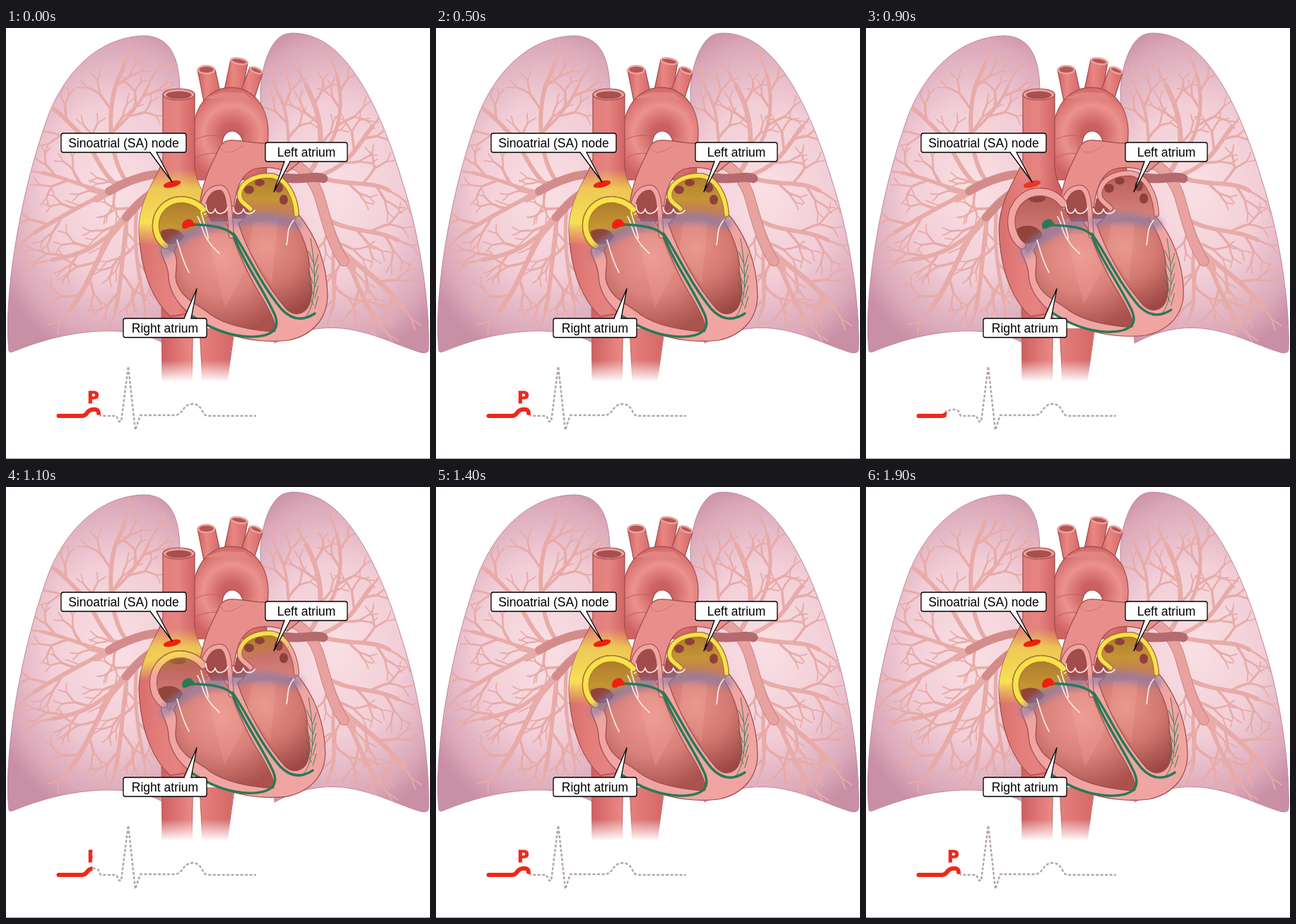
Recreate the animation shown at these times as an HTML page. Size 600 by 610 pixels, loop 2000 ms.

```html
<!DOCTYPE html>
<html lang="en">
<head>
<meta charset="utf-8">
<title>Atrial depolarisation</title>
<style>
html, body { margin: 0; width: 100%; height: 100%; overflow: hidden; background: #fff; }
svg { display: block; width: 600px; height: 610px; }
text { font: 17.5px "Liberation Sans", Arial, sans-serif; }
.line { fill: none; stroke-linecap: round; stroke-linejoin: round; }
.edge { stroke: #a04a4b; stroke-width: 1.2; }
.label { fill: #fff; stroke: #000; stroke-width: 1.3; stroke-linejoin: round; }
</style>
</head>
<body>
<svg viewBox="0 0 600 610">
<defs>
  <radialGradient id="lungL" gradientUnits="userSpaceOnUse" cx="155" cy="230" r="245" gradientTransform="translate(34 0) scale(.78 1)">
    <stop offset="0" stop-color="#f9e0e4"/><stop offset=".5" stop-color="#f2ced7"/><stop offset=".85" stop-color="#dba9ba"/><stop offset="1" stop-color="#c98fa5"/>
  </radialGradient>
  <radialGradient id="lungR" gradientUnits="userSpaceOnUse" cx="465" cy="230" r="245" gradientTransform="translate(102 0) scale(.78 1)">
    <stop offset="0" stop-color="#f9e0e4"/><stop offset=".5" stop-color="#f2ced7"/><stop offset=".85" stop-color="#dba9ba"/><stop offset="1" stop-color="#c98fa5"/>
  </radialGradient>
  <linearGradient id="tube">
    <stop offset="0" stop-color="#cd5f60"/><stop offset=".4" stop-color="#e98783"/><stop offset="1" stop-color="#d46867"/>
  </linearGradient>
  <linearGradient id="body" gradientUnits="userSpaceOnUse" x1="188" y1="0" x2="290" y2="0">
    <stop offset="0" stop-color="#d86e6d"/><stop offset=".25" stop-color="#e27c79"/><stop offset=".55" stop-color="#e58481"/><stop offset=".8" stop-color="#d06161"/>
  </linearGradient>
  <radialGradient id="arch" gradientUnits="userSpaceOnUse" cx="320" cy="150" r="68">
    <stop offset=".2" stop-color="#cb6061"/><stop offset=".6" stop-color="#ec928d"/><stop offset="1" stop-color="#cf6263"/>
  </radialGradient>
  <linearGradient id="fade" x1="0" y1="0" x2="0" y2="1">
    <stop offset="0" stop-color="#fff" stop-opacity="0"/><stop offset="1" stop-color="#fff"/>
  </linearGradient>
  <radialGradient id="rv" gradientUnits="userSpaceOnUse" cx="305" cy="325" r="108">
    <stop offset="0" stop-color="#ea988f"/><stop offset=".5" stop-color="#da827b"/><stop offset="1" stop-color="#a9524e"/>
  </radialGradient>
  <radialGradient id="lv" gradientUnits="userSpaceOnUse" cx="368" cy="310" r="100">
    <stop offset="0" stop-color="#e69289"/><stop offset=".5" stop-color="#d27870"/><stop offset="1" stop-color="#9c4845"/>
  </radialGradient>
  <linearGradient id="atrium" x1="0" y1="0" x2="0" y2="1">
    <stop offset="0" stop-color="#b85e59"/><stop offset="1" stop-color="#dc877f"/>
  </linearGradient>
  <linearGradient id="ochre" x1="0" y1="0" x2="0" y2="1">
    <stop offset="0" stop-color="#ae7c2b"/><stop offset=".5" stop-color="#c59536"/><stop offset="1" stop-color="#b66f4e" stop-opacity=".2"/>
  </linearGradient>
  <linearGradient id="glow" gradientUnits="userSpaceOnUse" x1="0" y1="200" x2="0" y2="308">
    <stop offset="0" stop-color="#f2d645" stop-opacity="0"/><stop offset=".25" stop-color="#f0d650" stop-opacity=".85"/>
    <stop offset=".7" stop-color="#f6e055"/><stop offset="1" stop-color="#f2d645" stop-opacity="0"/>
  </linearGradient>
  <linearGradient id="wipe" gradientUnits="userSpaceOnUse" x1="235">
    <stop offset="0" stop-color="#fff"/><stop offset="1" stop-color="#000"/>
  </linearGradient>
  <mask id="spread" maskUnits="userSpaceOnUse" x="150" y="150" width="300" height="220">
    <rect x="150" y="150" width="300" height="220" fill="url(#wipe)"/>
  </mask>
  <filter id="soft" x="-20%" y="-60%" width="140%" height="220%"><feGaussianBlur stdDeviation="4"/></filter>
  <path id="lungPathL" d="M4 457C-4 380 20 230 62 118C92 48 142 12 196 11C236 12 246 48 246 92C246 130 238 160 232 190V452C205 432 165 426 120 430C75 434 40 446 10 458Q5 460 4 457Z"/>
  <path id="lungPathR" d="M598 455C600 400 588 300 560 215C538 140 500 50 450 20C430 8 405 4 392 10C372 20 360 60 360 95C362 130 364 170 366 200L380 446C410 430 440 422 475 425C520 430 550 448 586 459Q597 462 598 455Z"/>
  <path id="bodyPath" d="M222 94V185C218 208 190 235 188 285C190 345 208 385 232 408L290 400L285 240C272 225 266 205 267 185V94Z"/>
  <path id="raWall" d="M226 308C209 296 207 270 222 254C238 238 264 240 279 257"/>
  <path id="raRoom" d="M227 310C210 294 210 270 224 256C238 243 264 243 277 259L286 275C264 285 247 298 234 318Z"/>
  <path id="laWall" d="M346 256C338 248 328 245 331 232C336 215 356 208 375 209C396 212 410 238 411 264"/>
  <path id="laRoom" d="M346 256C338 248 328 245 331 232C336 215 356 208 375 209C396 212 410 238 411 272C390 268 360 264 334 276Z"/>
  <path id="vein" d="M368 178C404 184 430 202 442 234C452 264 458 300 478 330"/>
  <clipPath id="clipL"><use href="#lungPathL"/></clipPath>
  <clipPath id="clipR"><use href="#lungPathR"/></clipPath>
  <clipPath id="drawn"><rect id="head" x="60" y="500" width="80" height="70"/></clipPath>
</defs>
<rect width="600" height="610" fill="#fff"/>

<use href="#lungPathL" fill="url(#lungL)" stroke="#bd869b"/>
<use href="#lungPathR" fill="url(#lungR)" stroke="#bd869b"/>
<g id="treeL" class="line" clip-path="url(#clipL)" stroke="#e8aba8"></g>
<g id="treeR" class="line" clip-path="url(#clipR)" stroke="#e8aba8"></g>

<!-- great vessels -->
<path class="line" d="M212 207C188 210 168 218 146 231M210 232C194 240 182 254 170 268" stroke="#d48c8b" stroke-width="12"/>
<path d="M220 395H265L263 500H221ZM274 425H323L313 500H278Z" fill="url(#tube)"/>
<path d="M220 395L221 500M265 400L263 500M274 425L278 500M323 430L313 500" stroke="#bd5d5f"/>
<rect x="216" y="470" width="110" height="31" fill="url(#fade)"/>
<g class="edge" fill="url(#tube)">
  <path d="M318 45L308 92L334 94L342 49Z"/>
  <path d="M345 56L330 95L350 104L363 64Z"/>
  <path d="M271 59L280 104L304 95L296 59Z"/>
  <path fill="url(#arch)" d="M268 215C255 160 262 100 304 86C346 76 372 110 371 150L368 215H335L336 168C336 140 306 138 306 165L300 215Z"/>
</g>
<g fill="#b55556" stroke="#eda19c" stroke-width="2.500">
  <ellipse cx="283.500" cy="59" rx="11.500" ry="5.500"/>
  <ellipse cx="330" cy="47" rx="11.500" ry="4" transform="rotate(10 330 47)"/>
  <ellipse cx="354" cy="60" rx="9" ry="3.500" transform="rotate(22 354 60)"/>
</g>
<path class="line" d="M264 160C278 152 292 150 307 154M265 186C278 178 290 176 302 178" stroke="#bf605f"/>
<path d="M281 99L305 91L337 92L348 103L330 99L304 100Z" fill="#e18581"/>

<use href="#bodyPath" fill="url(#body)" class="edge"/>
<g mask="url(#spread)"><use href="#bodyPath" fill="url(#glow)"/></g>
<ellipse cx="244.500" cy="94" rx="22.500" ry="8" fill="#eda19c" class="edge"/>
<ellipse cx="244.500" cy="95" rx="18" ry="5.500" fill="#a94f50"/>

<use href="#vein" class="line" stroke="#c98283" stroke-width="15"/>
<use href="#vein" class="line" stroke="#e8a3a0" stroke-width="13"/>
<path class="line" d="M396 212C420 216 435 208 449 213" stroke="#b56a6e" stroke-width="13"/>
<path class="edge" fill="#e88f8b" d="M274 250C280 208 294 188 303 167C315 150 340 165 372 163C392 168 408 176 420 186L398 204C380 196 364 196 350 200C335 207 326 222 322 256Z"/>
<path class="line" d="M303 167C306 180 320 178 336 166" stroke="#cf7673"/>

<!-- ventricles -->
<g id="vent">
  <path class="edge" fill="#f0a5a2" d="M222 310C214 318 230 332 230 352C232 385 260 410 295 426C330 441 365 446 400 442C437 434 455 408 455 378C454 335 440 296 414 264L330 252L300 252L250 290Z"/>
  <path class="edge" fill="url(#rv)" d="M237 316C248 332 234 350 244 366C252 385 275 393 290 406C310 420 345 428 380 430C386 424 374 400 356 371C338 341 326 310 317 285L300 258L255 285Z"/>
  <path class="edge" fill="url(#lv)" d="M329 277C342 318 371 368 397 398C411 411 428 403 431 385C437 366 427 350 429 332C427 310 418 290 406 270C390 256 350 256 329 277Z"/>
  <path d="M284 290L316 292L338 344L310 396Z" fill="#f6aea4" opacity=".22"/>
  <path d="M350 275L385 272L376 362L344 315Z" fill="#f6aea4" opacity=".22"/>
</g>

<!-- outflow and valves -->
<path d="M281 256C281 238 290 228 302 228C313 230 317 245 317 274L290 274ZM320 270L326 240L346 256L350 270Z" fill="#a14d4b"/>
<path class="line" d="M278 256C281 232 293 225 304 226C316 229 316 252 319 294" stroke="#a04a4b" stroke-width="8"/>
<path class="line" d="M278 256C281 232 293 225 304 226C316 229 316 252 319 294" stroke="#f0a5a2" stroke-width="6"/>

<!-- atria -->
<g id="ra">
  <use href="#raRoom" fill="url(#atrium)"/>
  <ellipse cx="245" cy="251" rx="11" ry="5" fill="#8f4341"/>
  <use href="#raWall" class="line" stroke="#a04a4b" stroke-width="10.500"/>
  <use href="#raWall" class="line" stroke="#f0a5a2" stroke-width="8.500"/>
  <g mask="url(#spread)">
    <use href="#raRoom" fill="url(#ochre)"/>
    <use href="#raWall" class="line" stroke="#a57c2a" stroke-width="10"/>
    <use href="#raWall" class="line" stroke="#f8e14a" stroke-width="7.500"/>
  </g>
  <path d="M219 288C231 281 247 284 252 295C248 303 238 307 229 306C222 301 219 295 219 288Z" fill="#91443b"/>
</g>
<g id="la">
  <use href="#laRoom" fill="url(#atrium)"/>
  <use href="#laWall" class="line" stroke="#a04a4b" stroke-width="8"/>
  <use href="#laWall" class="line" stroke="#f0a5a2" stroke-width="6"/>
  <g mask="url(#spread)">
    <use href="#laRoom" fill="url(#ochre)"/>
    <use href="#laWall" class="line" stroke="#a57c2a" stroke-width="7.500"/>
    <use href="#laWall" class="line" stroke="#f8e14a" stroke-width="5.500"/>
  </g>
  <g fill="#8f403c">
    <ellipse cx="344" cy="229" rx="7" ry="6"/><ellipse cx="359" cy="219" rx="7" ry="5"/>
    <ellipse cx="386" cy="226" rx="6" ry="7"/><ellipse cx="393" cy="243" rx="6" ry="7"/>
  </g>
</g>
<path class="line" filter="url(#soft)" opacity=".68" d="M225 318C245 294 270 284 304 276M324 274C350 264 385 270 412 277" stroke="#857ba9" stroke-width="15"/>
<g class="line" stroke="#f8e9e7" stroke-width="1.700">
  <path d="M283 250C284 266 294 264 296 256C298 266 310 264 314 254M322 256C324 266 334 264 336 256C338 265 348 264 352 258"/>
  <path d="M271 267C279 278 275 295 302 319M276 260C280 277 286 288 286 298M242 300C247 316 250 330 259 346M407 272C397 284 400 292 397 307"/>
</g>

<!-- conduction system -->
<g id="bundle" class="line" stroke="#287a55" stroke-width="3.500">
  <path d="M262 278C292 279 312 282 322 293C334 328 362 366 380 405C389 427 376 437 345 437C315 436 290 426 264 408"/>
  <path d="M322 291C342 320 360 362 390 398C406 415 422 414 437 404"/>
  <path id="hairs" stroke-width=".9"/>
</g>
<path id="av" d="M249 280C249 273 258 268 263 272L268 279C266 282 261 280 257 283C253 285 249 285 249 280Z"/>
<ellipse id="sa" cx="235" cy="221" rx="12.500" ry="4.500" transform="rotate(-14 235 221)" fill="#f0200f"/>

<!-- labels -->
<g id="labels"></g>

<!-- trace -->
<path class="line" style="stroke-linecap:butt" stroke="#b3a5aa" stroke-width="2.500" stroke-dasharray="4 2.500" d="M74 549H108C116 549 113 541 122 540C132 539 132 545 134 549H156L160 557H163L173 479L183 569L190 548H238C252 548 248 533 264 532C280 533 276 549 286 549H354"/>
<g clip-path="url(#drawn)">
  <path class="line" stroke="#f0281b" stroke-width="6" d="M74.500 549H108C116 549 113 541 122 540C130 539 131 542 131 545"/>
  <text x="115" y="530.500" fill="#f0281b" stroke="#f0281b" stroke-width=".8" style="font:bold 23px 'DejaVu Sans',sans-serif">P</text>
</g>
<path d="M0 609.500H600" stroke="#9a9a9a"/>
</svg>
<script>
const $ = id => document.getElementById(id);
const add = (parent, tag, attrs) => {
  const el = document.createElementNS("http://www.w3.org/2000/svg", tag);
  for (const key in attrs) el.setAttribute(key, attrs[key]);
  return parent.appendChild(el);
};
const clamp = x => Math.min(1, Math.max(0, x));

let seed = 11;
const rand = () => (seed = (seed * 16807) % 2147483647) / 2147483647;

// Forked twigs, collected by depth
function twig(out, x, y, angle, length, depth) {
  const bend = (rand() - .5) * .7;
  const mx = x + Math.cos(angle) * length / 2, my = y + Math.sin(angle) * length / 2;
  const ex = mx + Math.cos(angle + bend) * length / 2, ey = my + Math.sin(angle + bend) * length / 2;
  out[depth] += `M${x} ${y}Q${mx} ${my} ${ex} ${ey}`;
  if (depth) for (const side of [-1, 1])
    twig(out, ex, ey, angle + bend + side * (.3 + rand() * .35), length * .72, depth - 1);
}

function tree(group, branches) {
  const twigs = ["", "", ""];
  for (const [width, d] of branches) {
    const path = add(group, "path", { d, "stroke-width": width });
    const total = path.getTotalLength();
    let side = 1;
    for (let f = .4; f < 1.05; f += .2) {
      const at = Math.min(f, 1) * total;
      const p = path.getPointAtLength(at), q = path.getPointAtLength(at - 4);
      const turn = f > .95 ? 0 : side * (.55 + rand() * .3);
      twig(twigs, p.x, p.y, Math.atan2(p.y - q.y, p.x - q.x) + turn, 20 + rand() * 9, f > .95 ? 1 : 2);
      side = -side;
    }
  }
  twigs.forEach((d, i) => add(group, "path", { d, "stroke-width": 1.8 + i * .9 }));
}

tree($("treeL"), [
  [10, "M200 210C170 216 150 230 128 242"],
  [6, "M158 224C130 200 125 170 105 150S75 118 62 112"],
  [6, "M170 216C150 190 145 140 150 105S165 65 168 50"],
  [5, "M142 232C110 225 85 212 52 205"],
  [6, "M140 234C110 250 80 265 40 290"],
  [10, "M205 236C180 250 170 268 150 290"],
  [6, "M152 288C125 310 110 320 66 328"],
  [7, "M155 284C130 320 120 360 90 400"],
  [6, "M172 265C165 310 165 350 155 400"],
  [5, "M185 253C180 300 186 340 195 385"],
  [4, "M148 150C165 135 190 110 202 80"]
]);
tree($("treeR"), [
  [7, "M420 214C455 185 450 130 425 82"],
  [5, "M444 180C470 160 480 110 468 66"],
  [6, "M440 210C490 195 500 160 518 140"],
  [6, "M445 212C490 225 515 215 542 230"],
  [11, "M445 240C456 275 465 310 490 340"],
  [6, "M457 272C490 290 525 285 554 300"],
  [7, "M470 310C500 340 530 355 562 395"],
  [6, "M485 333C500 370 510 395 528 418"],
  [5, "M465 310C458 340 470 380 460 402"],
  [4, "M405 200C395 160 405 130 385 92"]
]);

let hairs = "M422 411C439 395 440 350 431 298";
for (let i = 0; i < 5; i++) {
  const y = 332 + i * 15;
  hairs += `M435 ${y}l-7 -16M437 ${y + 5}l5 -17`;
}
$("hairs").setAttribute("d", hairs);

// Box, pointer base, pointer tip, text
for (const [x, y, w, a, b, base, tx, ty, label] of [
  [78, 149, 177, 204, 213, 176, 235, 218, "Sinoatrial (SA) node"],
  [367, 162, 116, 394, 402, 189, 379, 232, "Left atrium"],
  [166, 411, 118, 252, 262, 411, 270, 369, "Right atrium"]
]) {
  const g = $("labels"), inside = base > y ? base - 1 : base + 1;
  add(g, "rect", { x, y, width: w, height: 27, rx: 3, class: "label" });
  add(g, "path", { d: `M${a} ${base}L${tx} ${ty}L${b} ${base}`, class: "label" });
  add(g, "path", { d: `M${a + 1} ${inside}H${b - 1}V${base}H${a + 1}Z`, fill: "#fff" });
  add(g, "text", { x: x + w / 2, y: y + 19.5, "text-anchor": "middle" }).textContent = label;
}

function scaleAbout(id, x, y, sx, sy) {
  $(id).setAttribute("transform", `translate(${x} ${y}) scale(${sx} ${sy}) translate(${-x} ${-y})`);
}

function render(ms) {
  const step = Math.floor((ms % 2000) / 100) * 100;
  const t = step < 700 ? 2000 : step;       // the finished beat holds across the loop
  const rest = 1 - clamp((t - 900) / 450);
  for (const id of ["vent", "bundle"]) scaleAbout(id, 228, 296, 1 - .025 * rest, 1 - .048 * rest);
  scaleAbout("ra", 280, 312, 1 + .09 * rest, 1 + .16 * rest);
  scaleAbout("la", 345, 275, 1, 1 + .05 * rest);

  const front = 198 + .27 * Math.max(0, t - 900);
  const wipe = $("wipe");
  wipe.setAttribute("y1", front - 13);
  wipe.setAttribute("x2", 240);
  wipe.setAttribute("y2", front + 13);

  $("head").setAttribute("width", Math.min(80, 45 + (t - 700) * .0435));
  $("sa").setAttribute("opacity", .35 + .65 * clamp((t - 700) / 300));
  $("av").setAttribute("fill", t < 1200 ? "#287a55" : "#f0200f");
}

const start = performance.now();
function tick() {
  render(Math.max(0, performance.now() - start));
  requestAnimationFrame(tick);
}
tick();
</script>
</body>
</html>
```
